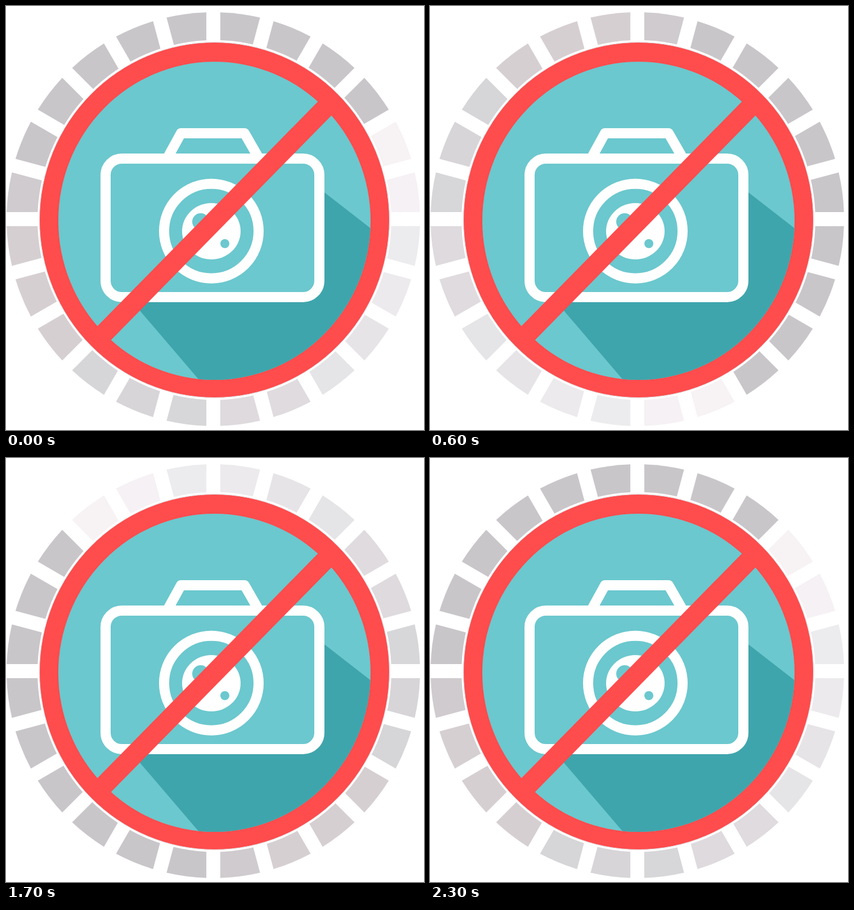
These frames come from a looping animation (743 px wide and 753 px high, 2.4 s). An HTML page:

```html
<!DOCTYPE html>
<html lang="en">
<head>
<meta charset="utf-8">
<title>No photography</title>
<style>
  html, body { margin: 0; width: 100%; height: 100%; overflow: hidden; background: #fff; }
  svg { display: block; width: 743px; height: 753px; }
</style>
</head>
<body>
<svg viewBox="0 0 743 753">
  <defs>
    <clipPath id="disc"><ellipse cx="370.5" cy="381.5" rx="277.5" ry="282.5"/></clipPath>
  </defs>
  <g id="wheel"></g>

  <ellipse cx="370.5" cy="380" rx="314.5" ry="319.5" fill="#fff"/>
  <ellipse cx="370.5" cy="380" rx="311" ry="315.5" fill="#ff4c4d" stroke="#dedcde"/>
  <ellipse cx="370.5" cy="381.5" rx="277.5" ry="282.5" fill="#6bc8ce"/>
  <path clip-path="url(#disc)" fill="#3fa5ac" d="M566 331L700 435V700H374L225 526Z"/>

  <g fill="none" stroke="#fff" stroke-width="18" stroke-linejoin="round">
    <path d="M289 266L311 226H424L447 266"/>
    <rect x="177" y="271" width="380" height="246" rx="29" fill="#6bc8ce"/>
    <circle cx="365" cy="399.8" r="84"/>
  </g>
  <ellipse cx="365" cy="400" rx="52" ry="50" fill="#fff"/>
  <g fill="#6bc8ce">
    <circle cx="346" cy="383" r="15"/>
    <circle cx="389" cy="422" r="8"/>
  </g>
  <path d="M576 172.3L164 591.7" stroke="#ff4c4d" stroke-width="34.5"/>
</svg>
<script>
const COUNT = 24, STEP_MS = 100, FIRST = 4;
const CX = 368.5, CY = 378.5, OUTER = 367.5, INNER = 300, HALF_GAP = 12.4;

// Shades from the brightest segment onward; all later ones stay at REST.
const SHADES = ['#f7f2f4', '#f6f1f4', '#ecebed', '#eceaec', '#e6e4e7', '#e5e4e6', '#dfdbde', '#dedadd',
  '#d7d6d8', '#d7d5d8', '#d6d5d8', '#d6cfd2', '#d6cfd2', '#d5cfd2', '#cfcbce'];
const REST = '#c9c6ca';

// Point on a circle whose distance to the spoke at `angle` is half a gap.
function corner(radius, angle, side) {
  const a = angle + side * Math.asin(HALF_GAP / radius);
  return `${(CX + radius * Math.sin(a)).toFixed(2)} ${(CY - radius * Math.cos(a)).toFixed(2)}`;
}

const wheel = document.getElementById('wheel');
const segments = Array.from({ length: COUNT }, (_, k) => {
  const from = k * 2 * Math.PI / COUNT, to = (k + 1) * 2 * Math.PI / COUNT;
  const path = document.createElementNS('http://www.w3.org/2000/svg', 'path');
  path.setAttribute('d', `M${corner(INNER, from, 1)}L${corner(OUTER, from, 1)}` +
    `A${OUTER} ${OUTER} 0 0 1 ${corner(OUTER, to, -1)}L${corner(INNER, to, -1)}Z`);
  return wheel.appendChild(path);
});

function draw(ms) {
  const head = FIRST + Math.floor(ms / STEP_MS) % COUNT;
  segments.forEach((segment, k) => {
    const age = (k - head + 2 * COUNT) % COUNT;
    segment.setAttribute('fill', SHADES[age] || REST);
  });
}

const start = performance.now();
function tick() {
  draw(performance.now() - start);
  requestAnimationFrame(tick);
}
tick();
</script>
</body>
</html>
```
